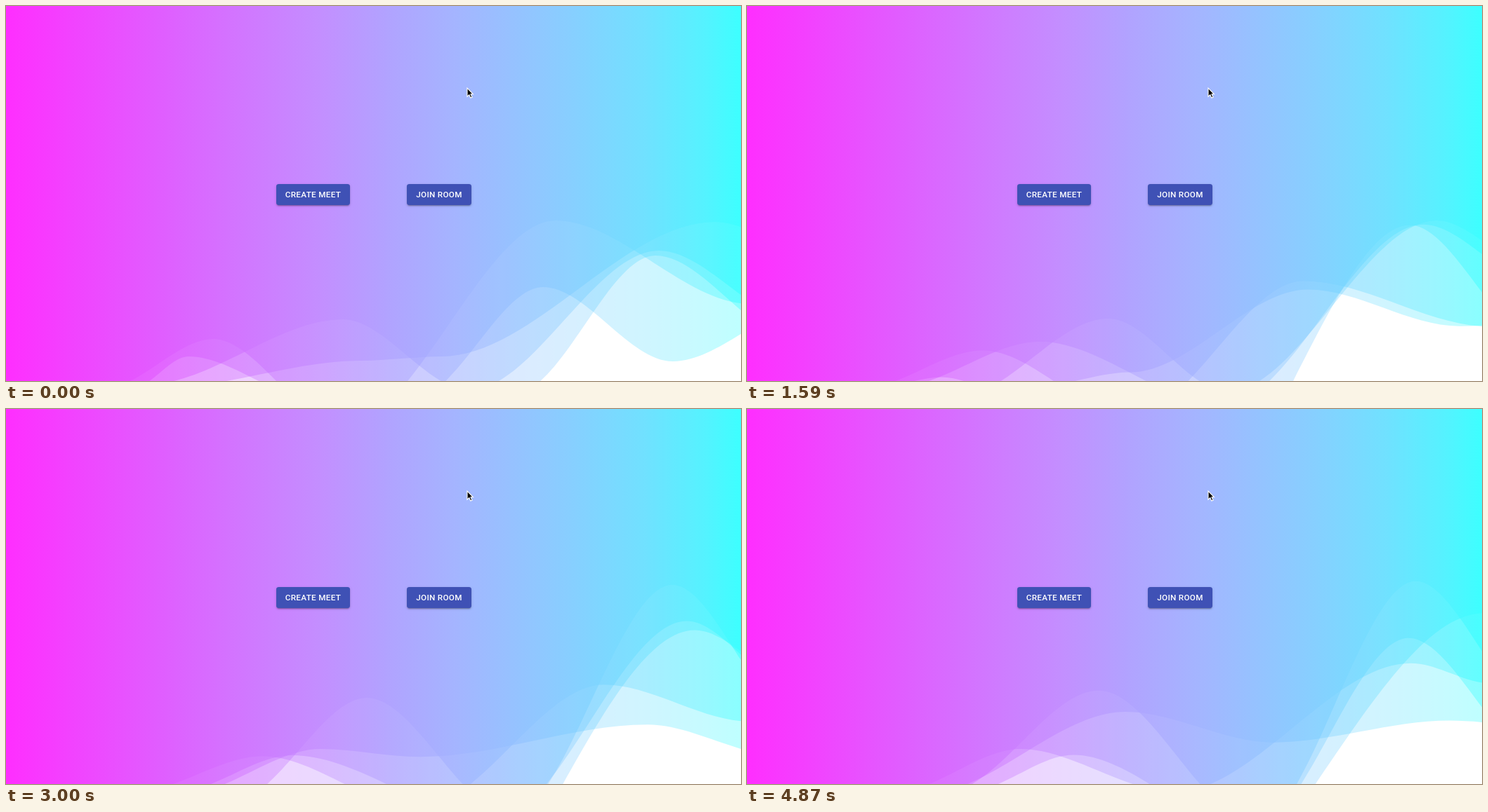
Write an HTML page with a canvas that moves like this. It is 1047x535 px and loops after 4.97 s.

```html
<!DOCTYPE html>
<html lang="en">
<head>
<meta charset="utf-8">
<title>Meet</title>
<style>
html, body { margin: 0; width: 100%; height: 100%; overflow: hidden; }
body {
  position: relative;
  background: linear-gradient(90deg, #ff2eff 0, #dc64ff 24%, #c38fff 43%, #b1a3ff 52%,
    #a3b6ff 62%, #87cfff 77%, #70e1ff 87%, #55f2ff 95%, #3dffff 100%);
}
canvas, svg, .button { position: absolute; }
canvas { left: 0; top: 0; filter: url(#depth); }
.button {
  top: 254px; height: 30px; border-radius: 3.4px;
  background: #3f51b5; color: #fff; text-align: center; white-space: nowrap;
  font: 500 11.67px/30px Roboto, sans-serif; letter-spacing: .333px;
  box-shadow: 0 2.5px 1px -1.7px rgba(0,0,0,.2), 0 1.7px 1.7px rgba(0,0,0,.14), 0 1px 4px rgba(0,0,0,.12);
}
svg { left: 655px; top: 115px; }
</style>
</head>
<body>
<canvas id="stage" width="1047" height="535"></canvas>
<div class="button" style="left:385px;width:105px">CREATE MEET</div>
<div class="button" style="left:571px;width:92px">JOIN ROOM</div>
<svg width="14" height="20" viewBox="0 0 14 20">
  <!-- Single waves stay faint; overlaps turn quickly to white. -->
  <filter id="depth" x="0" y="0" width="1" height="1" color-interpolation-filters="sRGB">
    <feComponentTransfer><feFuncA type="gamma" exponent="1.8"/></feComponentTransfer>
  </filter>
  <path d="M2 2V14.2L4.8 11.6L6.8 16L8.9 15.1L7 10.8H10.4Z" fill="#000" stroke="#fff" stroke-width="1.1"/>
</svg>
<script>
const W = 1047, H = 535, LOOP = 4970, STEP = LOOP / 55;

// A wave is a row of crests and troughs; each one lists the points it drifts through.
const waves = [
  [ // tall
    [[220, 545], [320, 560], [280, 545]],
    [[505, 506], [515, 422], [500, 402]],
    [[620, 500], [710, 570], [725, 590]],
    [[1010, 308], [980, 303], [945, 242], [955, 250]],
    [[1130, 340], [1130, 380], [1130, 450], [1130, 421]]
  ],
  [ // wide
    [[200, 540], [230, 545], [320, 545]],
    [[480, 447], [405, 490], [470, 493]],
    [[660, 548], [690, 580], [720, 600]],
    [[930, 349], [970, 303], [940, 329]],
    [[1130, 450], [1130, 394], [1130, 502]]
  ],
  [ // sinking shoulder
    [[140, 545], [215, 545]],
    [[295, 475], [355, 495], [390, 484]],
    [[480, 600], [575, 575], [610, 545]],
    [[783, 306], [795, 394], [865, 389], [950, 362]],
    [[1060, 425], [1060, 458], [1060, 440], [1060, 388]]
  ],
  [ // steep
    [[180, 545]],
    [[260, 500], [285, 545], [300, 580]],
    [[440, 560], [440, 640]],
    [[725, 552], [600, 770], [605, 723]],
    [[925, 356], [946, 312], [990, 316], [1055, 287]],
    [[1130, 478], [1130, 474], [1130, 370], [1130, 300]]
  ],
  [ // front
    [[250, 550]],
    [[400, 620], [430, 505], [545, 430]],
    [[580, 560], [565, 505], [760, 475]],
    [[765, 401], [805, 407], [935, 457], [1000, 440]],
    [[950, 507], [1020, 458], [1120, 500], [1180, 450]],
    [[1150, 425], [1240, 450], [1260, 450]]
  ]
];
const ctx = document.getElementById('stage').getContext('2d');

// Smooth curve through evenly timed points (Neville's scheme), u from 0 to 1.
function drift(points, u) {
  const last = points.length - 1, p = points.map(q => [...q]);
  for (let k = 1; k <= last; k++) {
    for (let i = 0; i <= last - k; i++) {
      const f = (u * last - i) / k;
      p[i] = p[i].map((v, axis) => v + (p[i + 1][axis] - v) * f);
    }
  }
  return p[0];
}

function fillWave(crests) {
  let [x, y] = crests[0];
  ctx.beginPath();
  ctx.moveTo(x, H + 300);
  ctx.lineTo(x, y);
  for (const [nx, ny] of crests.slice(1)) {
    const d = (nx - x) / 3;
    ctx.bezierCurveTo(x + d, y, nx - d, ny, nx, ny);
    [x, y] = [nx, ny];
  }
  ctx.lineTo(x, H + 300);
  ctx.fill();
}

function draw(now) {
  const t = Math.floor(now % LOOP / STEP) * STEP, u = t / (LOOP - STEP);
  ctx.clearRect(0, 0, W, H);
  ctx.globalCompositeOperation = 'lighter';
  ctx.fillStyle = 'rgba(255,255,255,.2)';
  for (const wave of waves) fillWave(wave.map(points => drift(points, u)));
  requestAnimationFrame(draw);
}
requestAnimationFrame(draw);
</script>
</body>
</html>
```
